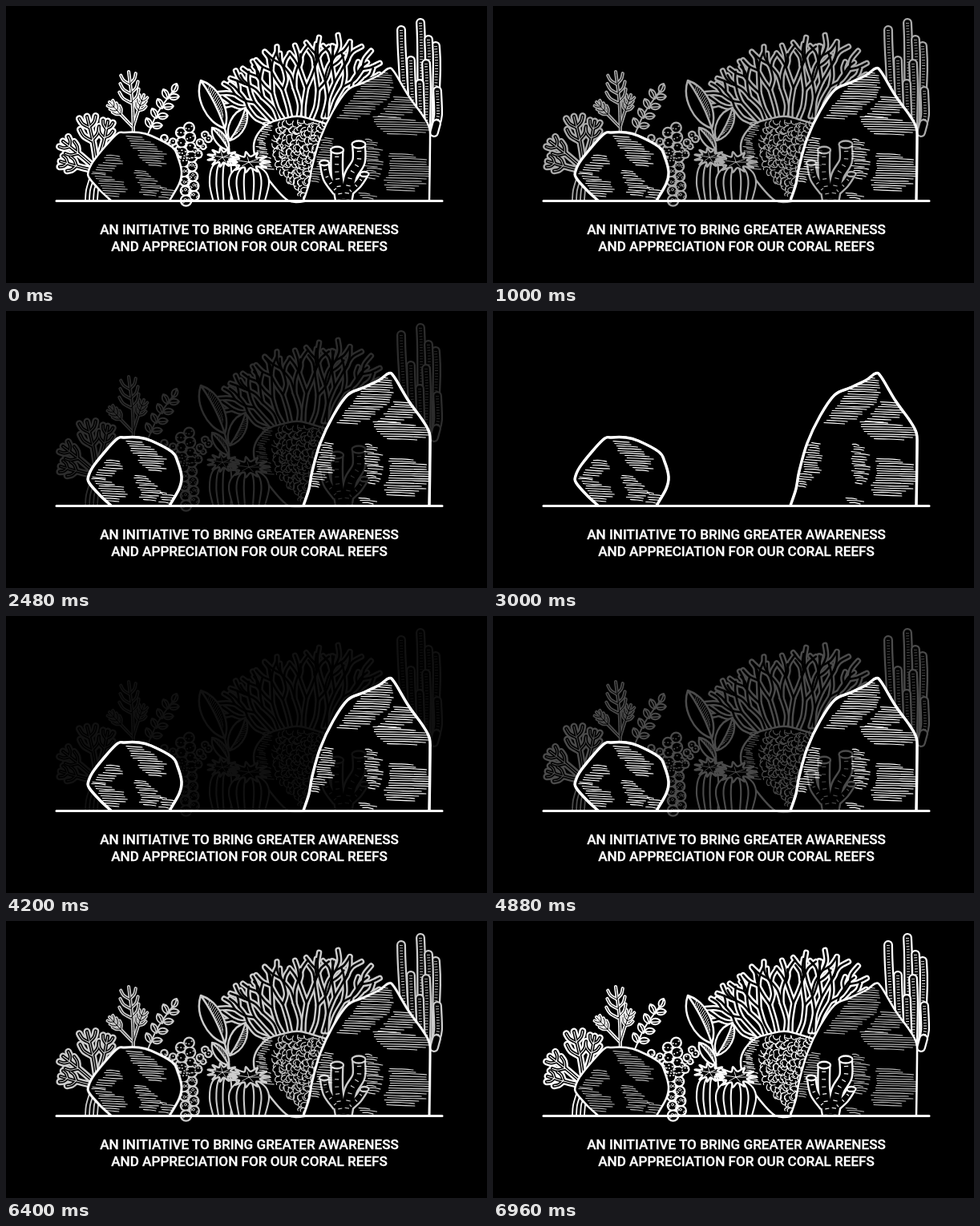
These frames come from a looping animation (600 px wide and 346 px high, 7000 ms). An HTML page:

```html
<!DOCTYPE html>
<html lang="en">
<head>
<meta charset="utf-8">
<title>Coral reefs</title>
<style>
html, body { margin: 0; width: 100%; height: 100%; overflow: hidden; background: #000; }
svg { display: block; width: 600px; height: 346px; }
path, circle, ellipse { fill: none; stroke: #fff; stroke-linecap: round; stroke-linejoin: round; }
text { font: 500 17.1px Roboto, Arial, sans-serif; fill: #fff; stroke: #fff; stroke-width: .35px; text-anchor: middle; }
</style>
</head>
<body>
<svg viewBox="0 0 600 346">
  <g id="back"></g>
  <g id="rocks"></g>
  <g id="shade"></g>
  <g id="bold"></g>
  <g id="front"></g>
  <path d="M63 243.5H544" stroke-width="3"/>
  <text x="303.5" y="284.7">AN INITIATIVE TO BRING GREATER AWARENESS</text>
  <text x="303.5" y="305.7">AND APPRECIATION FOR OUR CORAL REEFS</text>
</svg>
<script>
const [back, rocks, shade, bold, front] =
  ['back', 'rocks', 'shade', 'bold', 'front'].map(id => document.getElementById(id));
const { PI, sin, cos, hypot, atan2 } = Math;

let seed = 7;
const rand = () => (seed = seed * 16807 % 2147483647) / 2147483647;
const jitter = n => (rand() * 2 - 1) * n;
const range = n => [...Array(n).keys()];
const points = s => s.split(' ').map(p => p.split(',').map(Number));

function add(g, tag, attrs) {
  const el = document.createElementNS('http://www.w3.org/2000/svg', tag);
  for (const k in attrs) el.setAttribute(k, attrs[k]);
  g.append(el);
  return el;
}

// Catmull-Rom curve through the points
function smooth(p) {
  if (typeof p === 'string') p = points(p);
  const at = i => p[Math.max(0, Math.min(p.length - 1, i))];
  let d = 'M' + p[0];
  for (let i = 0; i < p.length - 1; i++) {
    const a = at(i - 1), b = at(i), c = at(i + 1), e = at(i + 2);
    const c1 = [0, 1].map(k => b[k] + (c[k] - a[k]) / 6);
    const c2 = [0, 1].map(k => c[k] - (e[k] - b[k]) / 6);
    d += `C${c1} ${c2} ${c}`;
  }
  return d;
}

const line = (g, p, w, style = '') => add(g, 'path', { d: smooth(p), style: `stroke-width:${w};${style}` });
const shape = (g, p, w = 2.5) => line(g, p, w, 'fill:#000');

// Merged outline of several tubes: wide white strokes with black cores
function tubes(g, list, w, rim, style = '') {
  list.forEach(p => line(g, p, w, style));
  list.forEach(p => line(g, p, w - rim * 2, 'stroke:#000;' + style));
}

// Forking, slightly wavy branch, returned as a list of curves
function grow(x, y, angle, len, depth) {
  const bend = jitter(0.25);
  const mid = [x + cos(angle + bend) * len / 2, y + sin(angle + bend) * len / 2];
  const end = [x + cos(angle) * len, y + sin(angle) * len];
  const list = [[[x, y], mid, end]];
  if (depth)
    for (const side of [-1, 1])
      list.push(...grow(...end, angle + side * (0.25 + rand() * 0.2), len * (0.6 + rand() * 0.2), depth - 1));
  return list;
}

// Stem with paired fingers that curl towards the tip
function frond(x, y, tx, ty, steps, reach) {
  const len = hypot(tx - x, ty - y), a = atan2(ty - y, tx - x);
  const list = [[[x, y], [(x + tx) / 2 + jitter(2), (y + ty) / 2], [tx, ty]]];
  for (const u of steps)
    for (const side of [-1, 1]) {
      const b = a + side * (0.8 + rand() * 0.2), r = len * reach * (1.3 - u * 0.7);
      const p = [x + (tx - x) * u, y + (ty - y) * u];
      const q = [p[0] + cos(b) * r * 0.6, p[1] + sin(b) * r * 0.6];
      list.push([p, q, [q[0] + cos(b - side * 0.5) * r * 0.5, q[1] + sin(b - side * 0.5) * r * 0.5]]);
    }
  return list;
}

function leaf(x, y, tx, ty, w, sw) {
  const len = hypot(tx - x, ty - y), deg = atan2(ty - y, tx - x) * 180 / PI;
  const g = add(back, 'g', { transform: `translate(${x} ${y}) rotate(${deg})` });
  add(g, 'path', {
    d: `M0 0C${len * 0.25} ${-w} ${len * 0.75} ${-w} ${len} 0C${len * 0.75} ${w} ${len * 0.25} ${w} 0 0Q${len / 2} ${w * 0.3} ${len} 0`,
    style: `stroke-width:${sw};fill:#000`
  });
  if (len > 30)
    for (let s = len * 0.2; s < len * 0.8; s += 3)
      line(g, [[s, w * 0.2], [s + 4, w * 0.6 * sin(PI * s / len)]], 0.9);
}

// Ragged rows that swell in the middle and drift sideways by lean
function hatch(g, x, y, w, h, lean) {
  for (let s = 0; s <= h; s += 3) {
    const u = s / h, a = x + lean * u + jitter(3), n = w * (0.55 + 0.45 * sin(PI * u)) + jitter(3);
    line(g, [[a, y + s - 0.5], [a + n / 2, y + s + jitter(0.6)], [a + n, y + s + 1]], 1.15);
  }
}

// Fan coral
const fan = [
  ...range(8).flatMap(i => grow(326 + i * 7.5, 146, (-142 + i * 9.5) * PI / 180, 31 + 13 * sin(i / 7 * PI * 0.65), 2)),
  ...range(4).flatMap(i => grow(396 + i * 4, 138, (-88 + i * 11) * PI / 180, 47 - i * 3, 2))
];
tubes(back, fan, 7.4, 2.4);

// Column coral
for (const [x, top] of points('493,30 517,21 536,50 527,42 505,68 524,72 516,97 538,106')) {
  const p = [[x, top], [x + 1, top + 30], [x * 0.8 + 105, 150]];
  tubes(back, [p], 12, 2.3);
  line(back, p, 4, 'stroke-linecap:butt;stroke-dasharray:.9 2.6');
}
tubes(back, [[[537, 147], [534, 158]]], 12, 2.3);

// Brain coral
shape(back, '378,243 352,243 326,215 313,195 309,175 314,160 327,147 345,141 367,138 402,148');
for (let y = 147; y < 242; y += 5.4) {
  const u = (y - 138) / 105, left = 309 + 62 * (u - 0.35) ** 2 * 1.6;
  if (y < 205) hatch(back, left + 6, y - 1, 18, 3, 0);
  for (let x = left + 26; x < 402 - u * 28; x += 5.4) {
    const cx = x + jitter(1.5), cy = y + jitter(1.5), a = rand() * PI, c = cos(a) * 3.6, s = sin(a) * 3.6;
    line(back, [[cx - c, cy - s], [cx - s * 0.4, cy + c * 0.4], [cx + c, cy + s], [cx + c + s * 0.6, cy + s - c * 0.6]], 1.2);
  }
}

// Lobed coral
const lobes = [[114, 205, 101, 138], [116, 190, 127, 144], [112, 203, 71, 169], [112, 206, 68, 194]]
  .flatMap(a => frond(...a, [0.55, 0.8], 0.3));
tubes(back, lobes, 9, 2.4);
lobes.forEach(p => line(back, p, 1.1));
range(4).forEach(i => line(back, [[104 + i * 4, 216 + i * 4], [100 + i * 5, 230], [99 + i * 5, 242]], 1.8));

// Feathery plant
tubes(back, [[159, 160, 153, 82], [157, 150, 129, 120], [159, 150, 172, 111]]
  .flatMap(a => frond(...a, [0.5, 0.65, 0.8], 0.25)), 4.2, 1.6);

// Sprig
line(back, '177,160 190,132 210,104', 2);
leaf(208, 108, 213, 97, 5, 1.8);
for (const i of range(4)) {
  const x = 181 + i * 7, y = 152 - i * 12;
  leaf(x, y, x - 6, y - 12, 5, 1.8);
  leaf(x + 1, y - 2, x + 14, y - 3, 5, 1.8);
}

// Knobbly coral, built from merged bumps
const bumps = [[230, 243, 223, 152, 9], [222, 192, 201, 165, 6], [233, 190, 252, 161, 6]].flatMap(([x, y, tx, ty, r]) => {
  const n = Math.round(hypot(tx - x, ty - y) / 6);
  return range(n + 1).map(i => {
    const u = i / n, side = i % 2 ? 1 : -1;
    return [x + (tx - x) * u + side * r * 0.6, y + (ty - y) * u, r * 0.85 + jitter(0.8)];
  });
});
bumps.forEach(([cx, cy, r]) => add(back, 'circle', { cx, cy, r, style: 'stroke:none;fill:#fff' }));
bumps.forEach(([cx, cy, r]) => add(back, 'circle', { cx, cy, r: r - 2.3, style: 'stroke:none;fill:#000' }));
bumps.forEach(([x, y]) => range(3).forEach(k => add(back, 'circle', {
  cx: x + (k - 1) * 4 + jitter(1), cy: y + jitter(2), r: y > 195 ? 1.5 : 0.6, style: 'stroke-width:1'
})));

// Broad-leaved plant
line(back, '272,150 276,166 279,186', 2.4);
leaf(273, 153, 243, 93, 17, 2.5);
leaf(279, 168, 299, 127, 13, 2.4);
leaf(278, 180, 257, 152, 9, 2.3);

// Barrel cacti with leafy crowns
function barrel(x, top, w) {
  for (const k of [1, 0.62, 0.25]) {
    const side = s => [[x + s * w * k * 0.8, 243], [x + s * w * k, 222], [x + s * w * k * 0.85, top + 9], [x + s * w * k * 0.3, top]];
    shape(back, [...side(-1), ...side(1).reverse()], 2.1);
  }
}
function crown(x, y, rx, ry) {
  const p = range(23).map(i => {
    const a = i / 11 * PI, r = i % 2 ? 0.55 : 1;
    return [x + cos(a) * rx * r, y + sin(a) * ry * r];
  });
  shape(back, p, 2.4);
  p.filter((q, i) => i % 4 === 0).forEach(q => line(back, [[x, y], [(x + q[0]) / 2, (y + q[1]) / 2]], 1));
}
barrel(276, 192, 22);
barrel(303, 199, 25);
crown(270, 189, 19, 12);
crown(303, 195, 26, 13);

// Rocks and their shading
function rock(outline, patches) {
  const id = 'clip' + outline.length;
  shape(rocks, outline, 2.5);
  line(bold, outline, 3.5);
  add(add(shade, 'clipPath', { id }), 'path', { d: smooth(outline) });
  const g = add(shade, 'g', { 'clip-path': `url(#${id})` });
  patches.forEach(p => hatch(g, ...p));
}
rock('131,243 118,231 104,215 103,206 111,191 137,161 148,158 166,158 181,162 207,176 214,188 219,207 216,222 204,243', [
  [148, 163, 32, 37, 30], [127, 187, 25, 21, -18], [110, 210, 31, 28, 12], [162, 206, 25, 32, 7], [195, 227, 18, 14, -5]
]);
rock('371,243 378,222 382,200 392,165 408,131 426,105 445,96 466,86 477,78 484,82 502,112 520,137 528,152 529,170 528,243', [
  [456, 83, 42, 58, -42], [484, 114, 36, 25, -18], [457, 139, 68, 21, 16], [395, 165, 18, 55, -14],
  [447, 167, 18, 48, 5], [480, 185, 55, 46, -8], [442, 234, 20, 7, 0]
]);

// Tube coral
const stems = [['397,196 401,215 413,232', 13], ['447,210 439,222 425,235', 12],
  ['413,180 413,210 418,241', 17], ['440,173 440,194 430,212 424,241', 18]];
const butt = 'stroke-linecap:butt;';
stems.forEach(([p, w]) => line(front, p, w, butt));
stems.forEach(([p, w]) => line(front, p, w - 4.8, butt + 'stroke:#000'));
stems.forEach(([p, w]) => {
  const [cx, cy] = points(p)[0];
  line(front, p, w * 0.3, butt + 'stroke-dasharray:1.2 8;stroke-dashoffset:-8');
  add(front, 'ellipse', { cx, cy, rx: w / 2 - 0.5, ry: w / 4, style: 'stroke-width:2.3;fill:#000' });
});

function frame(now) {
  const t = now % 7000;
  const coral = t < 3000 ? 1 - t / 3000 : Math.max(0, (t - 4000) / 3000);
  const glow = Math.min(1, (1 - coral) * 2.5);
  back.style.opacity = front.style.opacity = coral;
  bold.style.opacity = glow;
  shade.style.opacity = 0.7 + 0.3 * glow;
  requestAnimationFrame(frame);
}
frame(performance.now());
</script>
</body>
</html>
```
